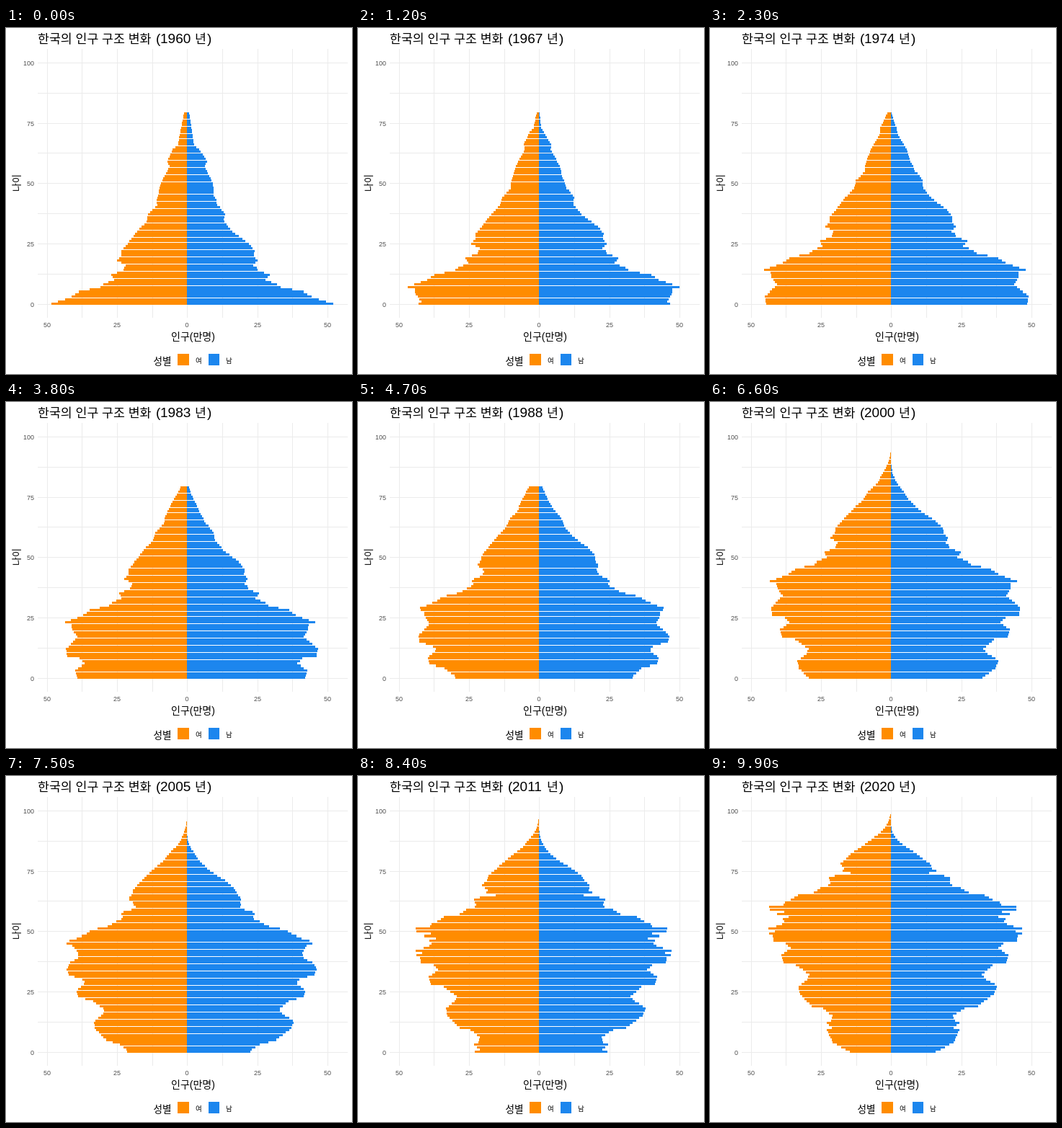
Write an HTML page that moves like this. It is 480 by 480 pixels and loops after 10 s.

```html
<!DOCTYPE html>
<html lang="ko">
<head>
<meta charset="utf-8">
<title>인구 구조 변화</title>
<style>
  html, body { margin: 0; width: 100%; height: 100%; overflow: hidden; background: #fff; }
  svg { display: block; width: 480px; height: 480px; font-family: "Liberation Sans", "Noto Sans CJK KR", "Noto Sans CJK", sans-serif; }
  .tick { font-size: 9px; fill: #4d4d4d; }
  .ko { font-size: 17.3px; }
  .num { font-size: 19px; }
  .axis { font-size: 14px; text-anchor: middle; }
  .key { font-size: 9.5px; }
  path, rect { shape-rendering: crispEdges; }
  .w { fill: #ff8c00; }
  .m { fill: #1c86ee; }
</style>
</head>
<body>
<svg viewBox="0 0 480 480">
  <path id="grid" fill="#ebebeb"/>
  <path id="women" class="w"/>
  <path id="men" class="m"/>
  <g id="ticks" class="tick"></g>
  <text y="21"><tspan class="ko" x="44">한국의 인구 구조 변화</tspan><tspan class="num" x="208">(</tspan><tspan class="num" x="214" id="year">1960</tspan><tspan class="ko" x="262">년</tspan><tspan class="num" x="279">)</tspan></text>
  <text class="axis" x="259.5" y="433">인구(만명)</text>
  <text class="axis" style="font-size:13px" transform="translate(18.5 215) rotate(-90)">나이</text>
  <text x="204.5" y="467" font-size="13.6">성별</text>
  <rect class="w" x="238" y="452" width="16" height="16"/>
  <text class="key" x="263" y="465">여</text>
  <rect class="m" x="281" y="452" width="15" height="16"/>
  <text class="key" x="305" y="465">남</text>
</svg>
<script>
const $ = id => document.getElementById(id);
const FRAMES = 100, FIRST = 1960, SPAN = 60;
const mix = (a, b, t) => a + (b - a) * t;
const xOf = people => 251.3 + 3.893 * people;
const yOf = age => 382.75 - 3.349 * age;

// Turning points of the female cohort size (bar length) by birth year.
const cohorts = {
  1881: 4, 1890: 10, 1894: 12, 1896: 20, 1901: 27, 1903: 24, 1910: 36, 1917: 42, 1919: 41,
  1923: 54, 1926: 56, 1930: 69, 1936: 85, 1938: 91, 1940: 91, 1942: 97, 1944: 85, 1946: 88,
  1948: 105, 1950: 101, 1952: 116, 1953: 120, 1955: 150, 1957: 160, 1960: 188, 1961: 177,
  1963: 174, 1966: 164, 1971: 177, 1974: 173, 1975: 154, 1977: 146, 1980: 157, 1983: 152,
  1984: 134, 1988: 115, 1990: 118, 1993: 130, 1996: 128, 2001: 111, 2002: 95, 2005: 82,
  2007: 84, 2008: 90, 2010: 82, 2011: 89, 2016: 81, 2020: 57
};
// Men per woman at the start of a cohort.
const maleRatio = {
  1881: .75, 1895: .83, 1900: 1.03, 1910: 1, 1915: .93, 1920: 1.04, 1925: .93, 1930: .91,
  1935: 1.05, 1942: 1.01, 1945: 1.12, 1950: 1.08, 1961: 1.08, 1970: 1.1, 1980: 1.08,
  1984: 1.08, 1992: 1.16, 2001: 1.1, 2005: 1.06, 2020: 1.09
};
// Cohorts whose size is revised between 2000 and 2011.
const revised = {
  1946: .81, 1951: .95, 1954: .93, 1959: .96, 1960: 1.03, 1961: 1.08, 1962: .955,
  1963: 1.02, 1964: .93, 1968: 1.03, 1969: 1.08, 1971: 1.03
};

function curve(points, x) {
  const xs = Object.keys(points).map(Number);
  const i = xs.findIndex(v => v >= x);
  if (i < 0) return points[xs[xs.length - 1]];
  if (i === 0) return points[xs[0]];
  return mix(points[xs[i - 1]], points[xs[i]], (x - xs[i - 1]) / (xs[i] - xs[i - 1]));
}

// Yearly loss: a steady part plus ageing, which eases as the years pass.
function loss(age, year, male) {
  const t = year - 1967;
  const steady = year < 1983 ? .0045 : .0005;
  const ageing = .075 * Math.exp(-.042 * t + (.115 + .0008 * t) * (age - 72));
  return male ? 1.25 * steady + 2.2 * ageing : steady + ageing;
}

function size(birth, year, male) {
  let lost = 0;
  for (let y = Math.max(birth, FIRST); y < year; y++) lost += loss(y + .5 - birth, y + .5, male);
  const start = curve(cohorts, birth) * (male ? curve(maleRatio, birth) : 1);
  const revision = Math.min(1, Math.max(0, (year - 2000) / 11));
  return start * Math.exp(-lost) * mix(1, revised[birth] || 1, revision);
}

const profiles = male => Array.from({ length: SPAN + 1 }, (_, i) => {
  const year = FIRST + i;
  return Array.from({ length: year < 2000 ? 80 : 101 }, (_, age) => size(year - age, year, male));
});
const women = profiles(false), men = profiles(true);

function bars(years, i, t, dir) {
  const next = years[Math.min(i + 1, SPAN)];
  return years[i].map((v, age) => {
    const w = Math.round(mix(v, next[age], t));
    const top = Math.round(yOf(age + .45)), bottom = Math.round(yOf(age - .45));
    return w ? `M251 ${top}h${dir * w}V${bottom}H251z` : "";
  }).join("");
}

function drawGrid() {
  let d = "", labels = "";
  for (let v = -50; v <= 50; v += 12.5) {
    const x = Math.round(xOf(v));
    d += `M${x} 29h1V402h-1z`;
    if (v % 25 === 0) labels += `<text x="${x}" y="415" text-anchor="middle">${Math.abs(v)}</text>`;
  }
  for (let v = 0; v <= 100; v += 12.5) {
    const y = Math.round(yOf(v));
    d += `M44 ${y}h430v1H44z`;
    if (v % 25 === 0) labels += `<text x="39" y="${y + 4}" text-anchor="end">${v}</text>`;
  }
  $("grid").setAttribute("d", d);
  $("ticks").innerHTML = labels;
}

// Each year falls on a whole frame; bars move evenly between years.
const frameOf = i => Math.round((FRAMES - 1) * i / SPAN);
let shown = -1;
const start = performance.now();
function draw(now) {
  const frame = Math.floor(Math.max(0, now - start) / 100) % FRAMES;
  if (frame !== shown) {
    shown = frame;
    let i = 0;
    while (i < SPAN && frameOf(i + 1) <= frame) i++;
    const t = (frame - frameOf(i)) / (frameOf(i + 1) - frameOf(i));
    $("women").setAttribute("d", bars(women, i, t, -1));
    $("men").setAttribute("d", bars(men, i, t, 1));
    $("year").textContent = Math.round(FIRST + frame * SPAN / (FRAMES - 1));
  }
  requestAnimationFrame(draw);
}
drawGrid();
draw(start);
</script>
</body>
</html>
```
